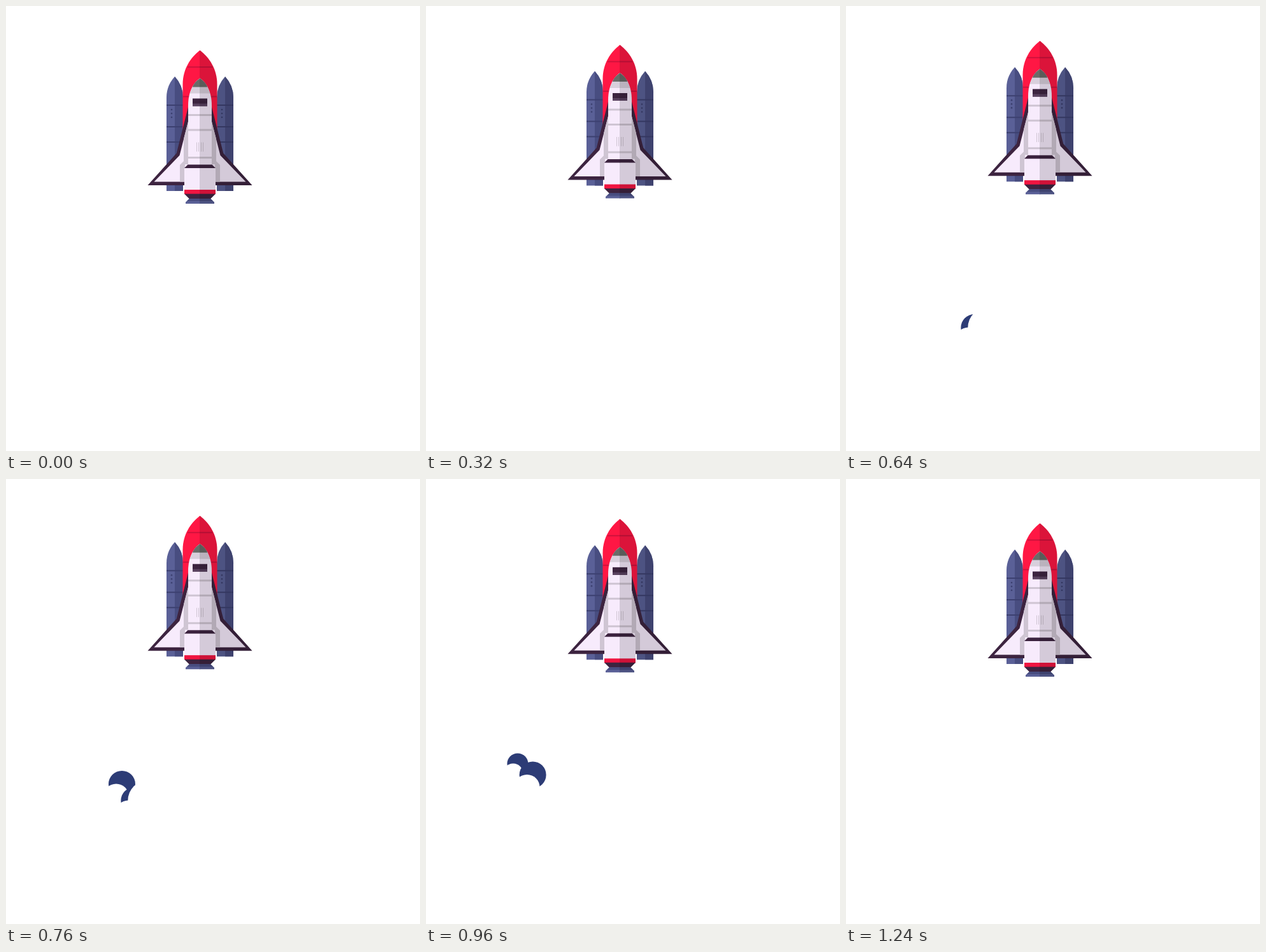
Animation of 650x700 px, one loop 1320 ms. Source, as an HTML page:

```html
<!DOCTYPE html>
<html>
<head>
<meta charset="utf-8">
<style>
  html, body { margin: 0; width: 100%; height: 100%; overflow: hidden; background: #fff; }
  svg { display: block; }
  .shade { filter: brightness(.86); }
</style>
</head>
<body>
<svg width="650" height="700" viewBox="0 0 650 700">
  <defs>
    <g id="booster">
      <path fill="#5a6097" d="M265 111Q252 125 252 144V291H278V144Q278 125 265 111"/>
      <path fill="#484d80" d="M265 111Q278 125 278 144V291H265Z"/>
      <path stroke="#3c4070" stroke-width="2" d="M252 156H278M252 190H278M252 214H278"/>
      <g fill="#3c4070">
        <circle cx="260" cy="163" r="1.3"/><circle cx="260" cy="169" r="1.3"/><circle cx="260" cy="175" r="1.3"/>
      </g>
    </g>
    <g id="tank">
      <path fill="#ff1744" d="M305 70L304 70C290 81 277.500 99 277.500 123V230H305Z"/>
      <path stroke="#d0123c" stroke-width="2" d="M285 96H305M278 142.500H305"/>
    </g>
    <g id="half">
      <path fill="#3d2440" d="M286 159L267.800 231.500L222.500 282H290V159Z"/>
      <path fill="#f7ebfc" d="M286 182L272.500 235L232.500 276.500H290V182Z"/>
      <path fill="#cfc5d3" d="M286 182L279 209V244L273 250V276.500H281V249H287V182Z"/>
      <path fill="#f7ebfc" d="M305 113.500C294 120 286 136 286 156V250H305Z"/>
      <path fill="#d8cfdc" d="M305 126H293L288.600 137.500H305Z"/>
      <path fill="#696b68" d="M305 113.500C299 117 295 122 292.500 127.500H305Z"/>
      <path stroke="#cfc5d3" stroke-width="3" d="M286 171.500H305M286 195H305M286 238.500H305"/>
      <path stroke="#cfc5d3" d="M299.500 214.500V229M302.500 214.500V229"/>
      <path fill="#3d2440" d="M293 145.500H305V157.500H293Z"/>
      <path fill="#5a4260" d="M293 153.500H305V157.500H293Z"/>
      <path fill="#f7ebfc" d="M280 255H305V290H280Z"/>
      <path fill="#3d2440" d="M285.500 249.500H305V255H280Z"/>
      <path fill="#f01541" d="M280 289H305V296H280Z"/>
      <path fill="#3d2440" d="M280 295.500H305V304H288.500Z"/>
      <path fill="#5a6097" d="M288 303H305V311H282V308.500Z"/>
      <path fill="#484d80" d="M288 303H305V307H284Z"/>
    </g>
  </defs>
  <g id="puffs"></g>
  <g id="ship">
    <use href="#booster"/>
    <use href="#booster" x="79" class="shade"/>
    <use href="#tank"/>
    <g class="shade"><use href="#tank" transform="matrix(-1 0 0 1 609 0)"/></g>
    <use href="#half"/>
    <g class="shade"><use href="#half" transform="matrix(-1 0 0 1 609 0)"/></g>
  </g>
</svg>
<script>
const LOOP = 1320, STEP = 40, LAST = 1240;
const PEAK = 600, LANDED = 1220, RISE = 15.9;
const ship = document.getElementById('ship');
const puffs = document.getElementById('puffs');

const circle = (x, y, r, fill) => `<circle cx="${x}" cy="${y}" r="${r}" fill="${fill}"/>`;

// A navy puff, hollowed by one white circle and uncovered by another.
function puff(t) {
  if (t < 560 || t >= 1120) return '';
  const u = (t - 880) / 100;
  const x = 160 - 19.4 * u - .9 * u * u;
  const y = 459 - 15.3 * u + 1.75 * u * u;
  const r = 21 * (1 - Math.max(0, (t - 880) / 240) ** 1.4);
  const s = t - 640;
  const slide = 22 + s * (s < 0 ? .08 : .34);
  return circle(x, y, r, '#2d3c76')
    + circle(x - .43 * r, y + .93 * r, .95 * r, '#fff')
    + (t < 800 ? circle(x + slide, y, 32, '#fff') : '');
}

function draw(now) {
  const t = Math.min(LAST, Math.floor(now % LOOP / STEP) * STEP);
  const height = t < PEAK ? t / PEAK : Math.max(0, (LANDED - t) / (LANDED - PEAK));
  ship.setAttribute('transform', `translate(0 ${-RISE * height})`);
  puffs.innerHTML = puff(t) + puff(t - 120);
}

const start = performance.now();
function tick() {
  draw(performance.now() - start);
  requestAnimationFrame(tick);
}
tick();
</script>
</body>
</html>
```
